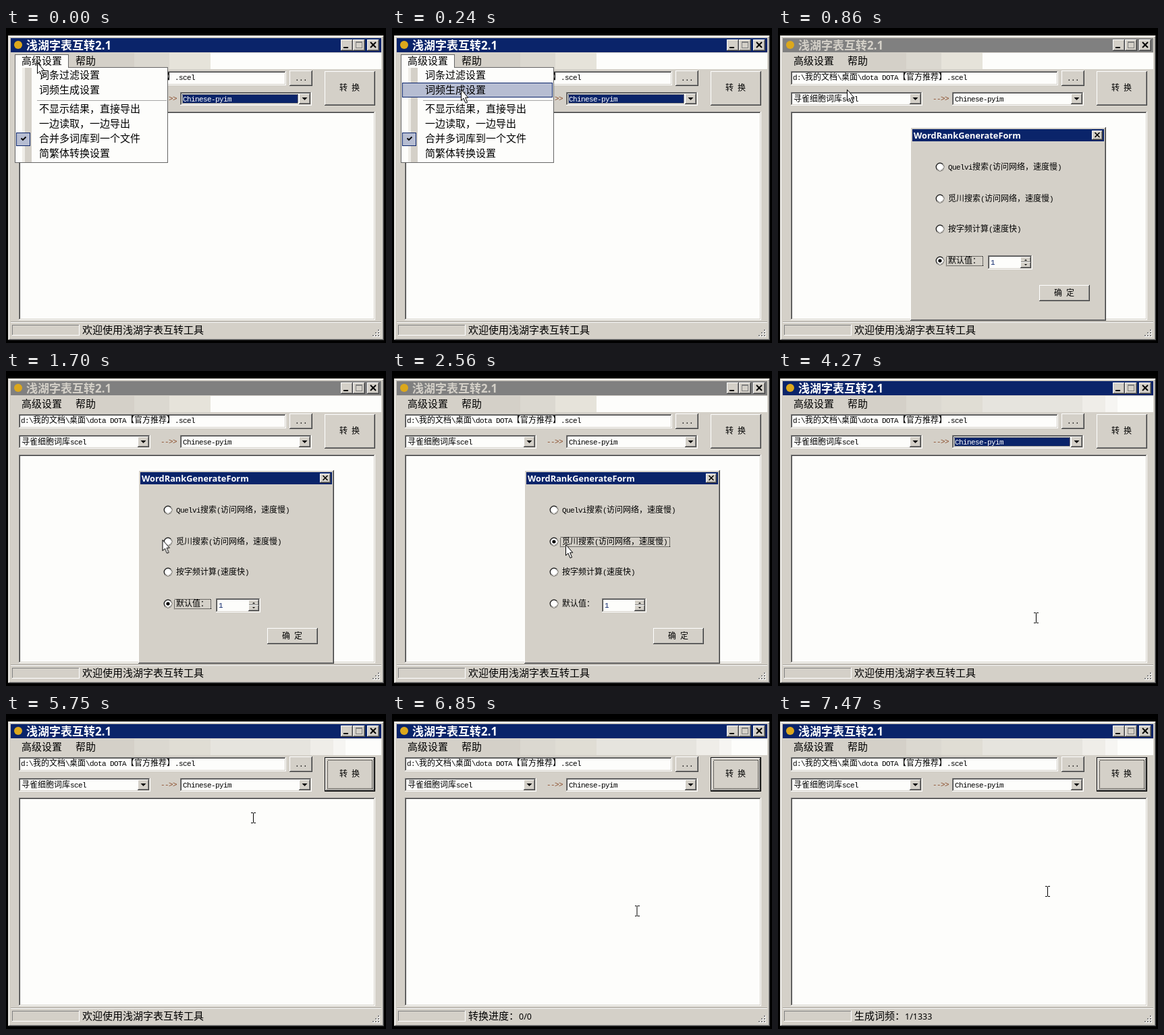
An HTML page that plays this animation: 563x467 px, repeating every 8 s.

```html
<!DOCTYPE html>
<html lang="zh-CN">
<head>
<meta charset="utf-8">
<title>字表互转</title>
<style>
html, body { margin: 0; width: 100%; height: 100%; overflow: hidden; background: #000; }
svg { display: block; width: 563px; height: 467px; }
rect { shape-rendering: crispEdges; }
text { font: 12px "Noto Sans CJK SC", "Noto Sans CJK", "Noto Sans", sans-serif; white-space: pre; }
.mono { font: 11px "Liberation Mono", monospace; letter-spacing: -.6px; }
.menu-text { font-size: 15px; }
.count { font: 500 12.5px "Noto Sans", sans-serif; }
.title { font: bold 17px "Noto Sans", "Noto Sans CJK SC", "Noto Sans CJK", sans-serif; }
.small-title { font: bold 12.8px "Noto Sans", sans-serif; }
.dots { fill: none; stroke: #000; stroke-dasharray: 1 1; shape-rendering: crispEdges; }
</style>
</head>
<body>
<svg id="stage" viewBox="0 0 563 467"></svg>
<script>
const LOOP = 8000;
const FACE = '#d4d0c8', NAVY = '#0a246a', PAPER = '#fdfdfb', HOVER = '#b6bdd2';
const style = document.querySelector('style');

const animate = (id, frames) => {
  style.textContent += `@keyframes ${id}{${frames}}` +
    `#${id}{animation:${id} ${LOOP}ms step-end -2ms infinite}`;
};

// Shows a group during the given [from, to] spans, in ms.
const shown = (id, spans, body) => {
  const marks = [[0, 0]];
  for (const [from, to] of spans) marks.push([from, 1], [to, 0]);
  const at = new Map(marks);
  if (at.has(LOOP)) at.set(LOOP, 1);
  animate(id, [...at].map(([t, o]) => `${t * 100 / LOOP}%{opacity:${o}}`).join(''));
  return `<g id="${id}">${body}</g>`;
};

// Path points are [ms, x, y, steps until the next point].
const pointer = (id, points, body) => {
  animate(id, points.map(([t, x, y, n]) =>
    `${t * 100 / LOOP}%{transform:translate(${x}px,${y}px);` +
    `animation-timing-function:${n ? `steps(${n},start)` : 'step-end'}}`).join(''));
  return `<g id="${id}">${body}</g>`;
};

const box = (x, y, w, h, fill) => `<rect x="${x}" y="${y}" width="${w}" height="${h}" fill="${fill}"/>`;
const framed = (x, y, w, h, line, fill) => box(x, y, w, h, line) + box(x + 1, y + 1, w - 2, h - 2, fill);
const raised = (x, y, w, h) => box(x, y, w, h, '#404040') + box(x, y, w - 1, h - 1, '#fff') +
  box(x + 1, y + 1, w - 2, h - 2, '#808080') + box(x + 1, y + 1, w - 3, h - 3, FACE);
const sunken = (x, y, w, h) => box(x, y, w, h, '#fff') + box(x, y, w - 1, h - 1, '#808080') +
  box(x + 1, y + 1, w - 2, h - 2, FACE) + box(x + 1, y + 1, w - 3, h - 3, '#404040') +
  box(x + 2, y + 2, w - 4, h - 4, PAPER);
const dots = (x, y, w, h) =>
  `<rect class="dots" x="${x + .5}" y="${y + .5}" width="${w - 1}" height="${h - 1}"/>`;
const text = (x, y, s, cls = '', fill = '#000') => `<text x="${x}" y="${y}" class="${cls}" fill="${fill}">${s}</text>`;
const label = (x, y, s, fill) =>
  text(x, y, s.replace(/[ -~]+/g, run => `<tspan class="mono">${run}</tspan>`), '', fill);
const path = (d, fill, stroke = 'none', width = 1) =>
  `<path d="${d}" fill="${fill}" stroke="${stroke}" stroke-width="${width}"/>`;
const triangle = (x, y, r, dir = 1) => path(`M${x - r} ${y}H${x + r}L${x} ${y + r * dir}Z`, '#000');
const cross = (x, y) => path(`M${x} ${y}l8 8m0 -8l-8 8`, 'none', '#000', 2);
const combo = (x, s) => sunken(x, 95, 195, 20) + label(x + 4, 109, s) +
  raised(x + 176, 97, 17, 16) + triangle(x + 184.5, 103, 4);
const radio = y => `<circle cx="240" cy="${y}" r="5.7" fill="#fff" stroke="#222" stroke-width="1.4"/>` +
  path(`M236 ${y + 4}A5.6 5.6 0 0 0 244 ${y - 4}`, 'none', FACE);
const dot = y => `<circle cx="240" cy="${y}" r="2.6" fill="#000"/>`;
const bands = list => list.map(([x, fill]) => box(x, 37, 556 - x, 24, fill)).join('');

const titleBar = (bar, ink) => box(7, 15, 549, 21, bar) +
  '<circle cx="18" cy="25" r="6" fill="#dca81c"/>' + text(30, 32, '浅湖字表互转2.1', 'title', ink) +
  raised(496, 17, 18, 17) + box(500, 28, 7, 2, '#000') +
  raised(514, 17, 18, 17) + framed(518, 20, 10, 10, '#808080', FACE) + box(518, 21, 10, 1, '#808080') +
  raised(535, 17, 18, 17) + cross(540, 21);

const grip = () => {
  let s = '';
  for (let r = 0; r < 3; r++)
    for (let c = 2 - r; c < 3; c++)
      s += box(543 + c * 4, 447 + r * 4, 3, 3, '#fff') + box(543 + c * 4, 447 + r * 4, 2, 2, '#808080');
  return s;
};

const frame = box(3, 11, 557, 452, '#404040') + box(3, 11, 556, 451, FACE) +
  box(4, 12, 554, 449, '#fff') + box(5, 13, 554, 449, '#808080') + box(5, 13, 553, 448, FACE);

const menuBar = bands([[7, FACE], [190, '#dbd8d0'], [242, '#e0ddd4'], [303, '#e6e4de'],
  [451, '#efede8'], [485, '#f6f5f2'], [503, PAPER]]);
const partialBar = bands([[190, '#dbd8d0'], [242, '#e6e3da'], [303, PAPER]]);

const controls = sunken(19, 64, 396, 21) + label(22, 77, 'd:\\我的文档\\桌面\\dota DOTA【官方推荐】.scel') +
  raised(420, 63, 34, 23) + label(428, 78, '...') +
  combo(19, '寻雀细胞词库scel') + label(229, 108, '--&gt;&gt;', '#8a4b28') + combo(258, 'Chinese-pyim') +
  raised(472, 64, 75, 51) + label(494, 93, '转 换') + sunken(19, 124, 528, 309) +
  box(7, 435, 549, 1, '#a8a59e') + box(7, 436, 549, 1, '#fff') +
  box(9, 440, 100, 16, '#fff') + box(9, 440, 99, 15, '#808080') + box(10, 441, 98, 14, FACE) + grip();

const selected = box(261, 98, 172, 14, NAVY) +
  '<rect class="dots" x="261.5" y="98.5" width="171" height="13" style="stroke:#f5db95"/>' +
  label(262, 109, 'Chinese-pyim', '#fff');

const status = s => text(113, 453, s, 'menu-text');
const counter = (name, n) => status(`${name}：`) + text(188, 453, n, 'count');

const items = [[75, '词条过滤设置'], [97, '词频生成设置'], [125, '不显示结果，直接导出'],
  [147, '一边读取，一边导出'], [169, '合并多词库到一个文件'], [191, '简繁体转换设置']];
const hover = y => framed(15, y, 223, 22, NAVY, HOVER);
const menu = framed(13, 39, 80, 21, '#666', PAPER) + framed(13, 58, 227, 142, '#666', PAPER) +
  box(14, 57, 78, 3, PAPER) + box(28, 59, 10, 140, FACE) + box(24, 59, 4, 140, '#efede8') +
  box(46, 107, 192, 1, '#a6a6a6') +
  shown('hoverFilter', [[120, 240]], hover(59)) + shown('hoverRank', [[240, 860]], hover(81)) +
  framed(15, 155, 21, 20, NAVY, HOVER) + path('M22.5 163.5l2.5 2.5l4.5 -4.5', 'none', '#000', 1.8) +
  items.map(([y, s]) => text(49, y, s, 'menu-text')).join('');

const dialog = raised(196, 147, 290, 287) + box(199, 150, 284, 18, NAVY) +
  text(201, 164, 'WordRankGenerateForm', 'small-title', '#fff') +
  raised(465, 152, 16, 14) + path('M469.5 155l7 7m0 -7l-7 7', 'none', '#000', 1.6) +
  [206, 253, 298, 345].map(radio).join('') +
  label(252, 210, 'Quelvi搜索(访问网络，速度慢)') + label(252, 257, '觅川搜索(访问网络，速度慢)') +
  label(252, 302, '按字频计算(速度快)') + label(252, 349, '默认值：') +
  sunken(311, 337, 66, 21) + label(315, 351, '1', NAVY) +
  raised(359, 339, 16, 9) + triangle(367, 345, 2, -1) + raised(359, 347, 16, 9) + triangle(367, 350, 2) +
  raised(387, 381, 75, 24) + label(409, 397, '确 定') +
  shown('defaultPick', [[860, 2070]], dot(345) + dots(249, 338, 55, 15)) +
  shown('searchPick', [[2070, 4270]], dot(253)) +
  shown('searchFocus', [[2070, 3400]], dots(249, 246, 163, 15)) +
  shown('okFocus', [[3400, 4270]], box(387, 381, 75, 24, '#000') + raised(388, 382, 73, 22) +
    dots(391, 385, 67, 16) + label(409, 397, '确 定'));

const arrow = path('M.5 .5V16.5L4 13.2L7 20.2L9.6 19.2L6.7 12.2H10.8Z', '#fff', '#000');
const beam = box(-3, -8, 3, 1, '#000') + box(1, -8, 3, 1, '#000') + box(0, -7, 1, 14, '#000') +
  box(-3, 7, 3, 1, '#000') + box(1, 7, 3, 1, '#000');

document.getElementById('stage').innerHTML = frame + titleBar(NAVY, '#fff') + menuBar + controls +
  shown('partial', [[0, 4270]], partialBar) +
  shown('comboFocus', [[0, 860], [4270, 5250]], selected) +
  shown('convertFocus', [[5250, LOOP]], box(472, 64, 75, 51, '#000') + raised(473, 65, 73, 49) +
    dots(476, 68, 67, 43) + label(494, 93, '转 换')) +
  shown('welcome', [[0, 5990]], status('欢迎使用浅湖字表互转工具')) +
  shown('converting', [[5990, 7220]], counter('转换进度', '0/0')) +
  shown('ranking', [[7220, LOOP]], counter('生成词频', '1/1333')) +
  shown('menu', [[0, 860]], menu) +
  text(23, 54, '高级设置', 'menu-text') + text(103, 54, '帮助', 'menu-text') +
  shown('dialog', [[860, 4270]], titleBar('#808080', FACE) + dialog) +
  pointer('arrow', [[0, 46, 51], [120, 70, 69], [240, 102, 91], [980, 102, 91, 6], [1700, 216, 247, 2],
    [1940, 247, 253], [2190, 244, 254], [2310, 242, 254], [2560, 257, 257], [2680, 257, 257, 5],
    [3279, 410, 395], [3280, 411, 393], [4270, -50, -50], [5000, 509, 100], [5750, -50, -50]], arrow) +
  pointer('beam', [[0, -50, -50], [4270, 382, 366], [4520, 382, 366, 4], [4999, 483, 150], [5000, -50, -50],
    [5750, 366, 154], [5870, 366, 154, 4], [6350, 326, 317], [6850, 326, 317, 2], [7090, 399, 267],
    [7470, 399, 263], [LOOP, 399, 263]], beam);
</script>
</body>
</html>
```
